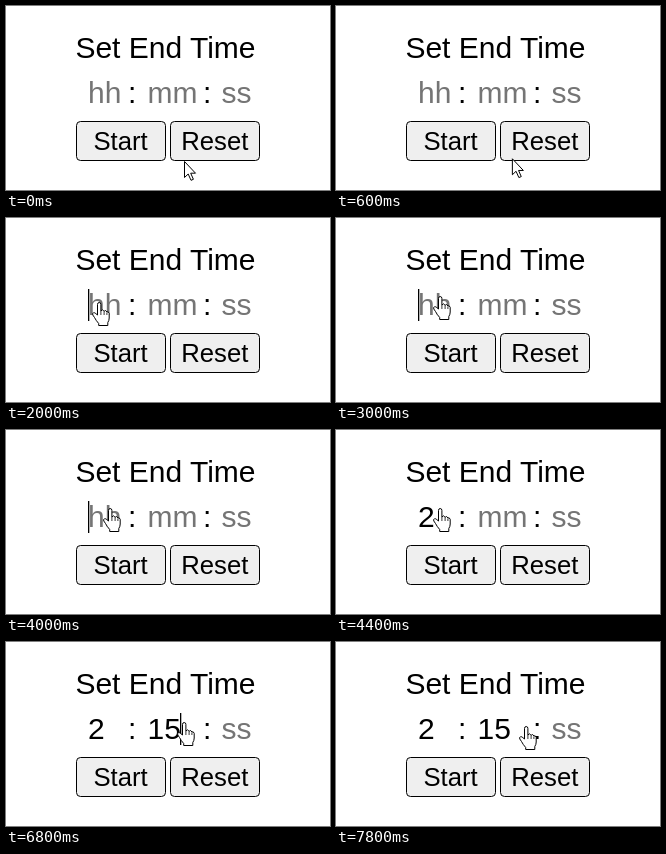
Recreate the animation shown at these times as an HTML page. Size 324 px wide and 184 px high, loop 8 s.

```html
<!DOCTYPE html>
<html lang="en">
<head>
<meta charset="utf-8">
<title>Set End Time</title>
<style>
  html, body { margin: 0; width: 100%; height: 100%; overflow: hidden; background: #fff; }
  svg { display: block; width: 324px; height: 184px; }
  text { font: 30px "Liberation Sans", Arial, sans-serif; }
  .hint { fill: #757575; }
  .button text { font-size: 25.7px; text-anchor: middle; }
  .button rect { fill: #efefef; stroke: #000; }
  .pointer { fill: #fff; stroke: #000; stroke-linejoin: round; }
</style>
</head>
<body>
<svg viewBox="0 0 324 184">
  <text x="69.4" y="52">Set End Time</text>
  <text id="hours" x="82" y="97"></text>
  <text x="122" y="97">:</text>
  <text id="minutes" x="141.5" y="97"></text>
  <text x="197" y="97">:</text>
  <text class="hint" x="215.5" y="97">ss</text>
  <g class="button">
    <rect x="70.5" y="115.5" width="89" height="39" rx="4"/>
    <text x="114.6" y="144">Start</text>
    <rect x="164.5" y="115.5" width="89" height="39" rx="4"/>
    <text x="208.8" y="144">Reset</text>
  </g>
  <rect id="caret" y="71" width="1.3" height="32"/>
  <path id="arrow" class="pointer" d="M.5 .5V16.5L4.2 13L7 19.3L9.4 18.3L6.7 12.2H11.5Z"/>
  <g id="hand" class="pointer">
    <path d="M5.5 13V2.5q0-2 1.7-2t1.7 2V9q1.6-2.5 3.2 .3q1.6-2 2.8 .7q1.4-1 2.3 1.3V16q0 2.5-1.4 4.5v3H6.7v-2Q4 18.5 2.5 15.5L.8 13q-.7-1.7.6-2.2 1.4-.4 2.4.8Z"/>
    <path d="M8.9 9v4m3.2-3.5v3.5m2.8-2.5v2.5" stroke-width=".8"/>
  </g>
</svg>
<script>
const LOOP = 8000, STEP = 200, BLINK = 530;
const [hours, minutes, caret, arrow, hand] =
  ["hours", "minutes", "caret", "arrow", "hand"].map(id => document.getElementById(id));

const home = { x: 178, y: 155 };
const stops = [
  { at: 800, x: 160, y: 132 },   // across Reset
  { at: 1400, x: 86, y: 84 },    // onto the hours
  { at: 2200, x: 97, y: 78 },
  { at: 5400, x: 171, y: 80 },   // onto the minutes
  { at: 7800, x: 183, y: 84 }
];

// Each glide ends on time; longer ways take longer.
function pointerAt(t) {
  let { x, y } = home;
  for (const stop of stops) {
    const dx = stop.x - x, dy = stop.y - y;
    const duration = 42 * Math.sqrt(Math.hypot(dx, dy));
    const k = Math.min(1, Math.max(0, 1 + (t - stop.at) / duration));
    x += dx * k;
    y += dy * k;
  }
  return [x, y];
}

function setField(field, hint, value, filled) {
  field.textContent = filled ? value : hint;
  field.classList.toggle("hint", !filled);
}

function show(node, visible) {
  node.setAttribute("visibility", visible ? "visible" : "hidden");
}

// The caret blinks from the moment of the last click or key.
function drawCaret(t, field, since) {
  const typed = field.classList.contains("hint") ? 0 : field.getComputedTextLength();
  caret.setAttribute("x", Math.floor(+field.getAttribute("x") + typed));
  show(caret, t >= since && (t - since) % (2 * BLINK) < BLINK);
}

function draw(now) {
  const t = Math.floor(now % LOOP / STEP) * STEP;
  const hoursTyped = t >= 4200, minutesTyped = t >= 6800;
  setField(hours, "hh", "2", hoursTyped);
  setField(minutes, "mm", "15", minutesTyped);

  if (hoursTyped) drawCaret(t, minutes, minutesTyped ? 6800 : 5300);
  else drawCaret(t, hours, 1880);

  const pointing = t >= 1400;
  show(arrow, !pointing);
  show(hand, pointing);
  (pointing ? hand : arrow).setAttribute("transform", `translate(${pointerAt(t)})`);
}

const start = performance.now();
function tick() {
  draw(performance.now() - start);
  requestAnimationFrame(tick);
}
tick();
</script>
</body>
</html>
```
